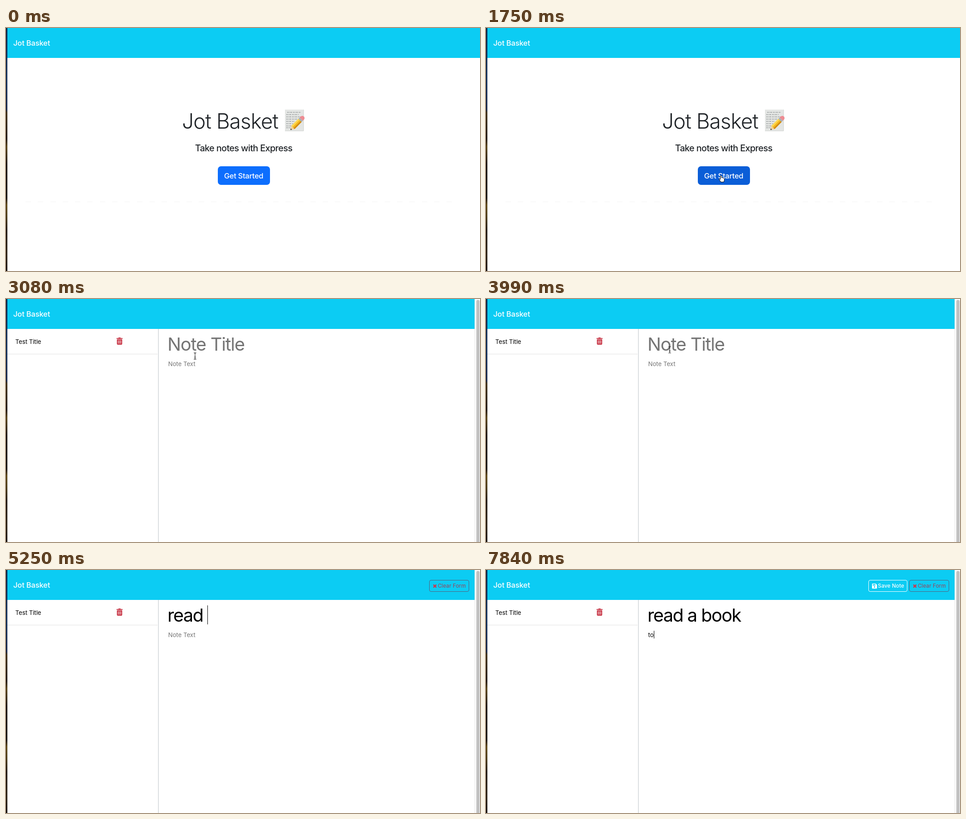
An HTML page that plays this animation: 1045x536 px, repeating every 8 s.

```html
<!DOCTYPE html>
<html lang="en">
<head>
<meta charset="utf-8">
<title>Notes</title>
<style>
html, body { margin: 0; width: 100%; height: 100%; overflow: hidden; background: #fff; }
#stage { position: relative; width: 1045px; height: 536px; overflow: hidden; background: #fff;
  font-family: Inter, "Liberation Sans", sans-serif; font-optical-sizing: none; color: #000; }
#stage div, #stage svg { position: absolute; }
/* Zero line height: top marks the middle of the capitals. */
.t { white-space: pre; line-height: 0; font-size: 13.2px; letter-spacing: 0; }
.mid { left: 3px; width: 1042px; text-align: center; }
#edge { left: 0; top: 0; width: 2.5px; height: 536px;
  background: linear-gradient(#0c2748, #12315c 110px, #16264a 180px, #3d2c0c 187px, #1d1407 245px,
    #57410f 262px, #1a1206 300px, #150e05 375px, #5e4712 390px, #4a380f 415px, #1f1608 445px, #2b1f0a 500px, #171006); }
#nav { left: 2.5px; right: 0; top: 0; height: 65.5px; background: #0cccf3; }
#brand { left: 16px; top: 33px; font-size: 16.5px; font-weight: 450; letter-spacing: -.01em; color: #fff; }
#head { left: 388px; top: 205px; font-size: 46px; font-weight: 300; letter-spacing: -.023em; color: #212529; }
#sub { top: 265px; font-size: 19.8px; font-weight: 550; letter-spacing: -.031em; color: #212529; }
#start { left: 466.5px; top: 304.5px; width: 115px; height: 41px; border-radius: 7px; background: #0d6efd; }
#start .t { left: 0; width: 100%; text-align: center; top: 21px; font-size: 16.5px; font-weight: 450; letter-spacing: -.018em; color: #fff; }
#rule { left: 42.7px; top: 383px; width: 942px; height: 1px;
  background: repeating-linear-gradient(90deg, #f4f4f4 0 12px, #fff 12px 27.3px); }
#bar { left: 1033px; top: 0; width: 12px; height: 536px; box-sizing: border-box; background: #fafafa; border-left: 1px solid #e8e8e8; }
#bar div { left: 3px; top: 2px; width: 7px; height: 545px; border-radius: 4px; background: #c1c1c1; }
#side { left: 335px; top: 66px; width: 1.5px; height: 470px; background: #dcdfe2; }
#sep { left: 3px; top: 120.5px; width: 331px; height: 1px; background: #e2e2e2; }
#title { left: 356px; top: 99.5px; font-size: 39.8px; letter-spacing: -.04em; }
#title .empty { letter-spacing: -.031em; }
#text { left: 357.5px; top: 143px; }
.empty { color: #757575; }
.caret { position: absolute; width: 1px; background: #000; }
#title .caret { height: 42px; margin-top: -22px; top: 0; }
#text .caret { height: 17px; margin-top: -9px; top: 0; }
.btn { top: 21.5px; height: 26px; box-sizing: border-box; border: 1px solid; border-radius: 4px; }
.btn .t { top: 12.3px; font-size: 11.6px; letter-spacing: .012em; }
#clear { left: 932.5px; width: 88px; border-color: #55607c; color: #9c4257; }
#save { left: 842.5px; width: 86px; border-color: #fff; color: #fff; }
#save .t { font-weight: 500; }
</style>
</head>
<body>
<div id="stage">
  <div id="edge"></div>
  <div id="nav"></div>
  <div id="brand" class="t">Jot Basket</div>

  <div id="home">
    <div id="head" class="t">Jot Basket</div>
    <svg style="left:613px;top:178px" width="48" height="52" viewBox="0 0 48 52">
      <rect x="2" y="2" width="41" height="47" fill="#e4e6e4"/>
      <path d="M2 49H43V2" fill="none" stroke="#cdd0cd"/>
      <path d="M7 8h30M5 13h27M5 18h31M5 23h26M5 28h18M5 33h15M5 38h12M5 42h9" fill="none"
        stroke="#75787a" stroke-width="1.2" stroke-dasharray="3 1 1.5 1.2 4 2"/>
      <g transform="translate(14 47) rotate(-45)">
        <path d="M0 0L8-5V5Z" fill="#efcf9c"/>
        <path d="M0 0L3-1.9V1.9Z" fill="#333"/>
        <path d="M8-5H30V5H8Z" fill="#f5b921"/>
        <path d="M8-5H30V-1.5H8Z" fill="#ffda55"/>
        <path d="M8 2H30V5H8Z" fill="#d08a14"/>
        <path d="M30-5H34V5H30Z" fill="#a9b1b5"/>
        <path d="M34-5H37Q42-4.5 42 0T37 5H34Z" fill="#ee8c93"/>
      </g>
    </svg>
    <div id="sub" class="t mid">Take notes with Express</div>
    <div id="start"><div class="t">Get Started</div></div>
    <div id="rule"></div>
  </div>

  <div id="notes">
    <div id="bar"><div></div></div>
    <div id="side"></div>
    <div id="list">
      <div id="sep"></div>
      <div class="t" style="left:20.5px;top:93.5px">Test Title</div>
      <svg style="left:243px;top:84px" width="15" height="18" viewBox="0 0 15 18" fill="#c52b3c">
        <path d="M.7 2.3H4.3L5.3 1H9.3L10.3 2.3H14V4H.7Z"/>
        <path d="M1.6 5H13.1V15Q13.1 16.7 11.4 16.7H3.3Q1.6 16.7 1.6 15Z"/>
        <path d="M4.5 7v7.5M7.35 7v7.5M10.2 7v7.5" stroke="#fff" stroke-width="1.1"/>
      </svg>
    </div>
    <div id="title" class="t"><span></span><i class="caret"></i></div>
    <div id="text" class="t"><span></span><i class="caret"></i></div>
    <div id="save" class="btn">
      <svg style="left:7px;top:7px" width="11" height="11" viewBox="0 0 11 11">
        <path d="M1.3 0H8.2L11 2.8V9.7Q11 11 9.7 11H1.3Q0 11 0 9.7V1.3Q0 0 1.3 0Z" fill="#fff"/>
        <path d="M1.7 1.6H7.6V4.2H1.7Z" fill="#0cccf3"/><circle cx="5.5" cy="7.3" r="1.6" fill="#0cccf3"/>
      </svg>
      <div class="t" style="left:20.5px">Save Note</div>
    </div>
    <div id="clear" class="btn">
      <svg style="left:7px;top:8px" width="9" height="9" viewBox="0 0 9 9">
        <path d="M1.3 1.3L7.7 7.7M7.7 1.3L1.3 7.7" stroke="#d3324a" stroke-width="2.4"/>
      </svg>
      <div class="t" style="left:18.5px">Clear Form</div>
    </div>
  </div>

  <svg id="pointer" style="left:0;top:0;overflow:visible" width="1" height="1">
    <path id="arrow" d="M0 0V11.2L2.6 8.8L4.3 12.8L6.2 12L4.5 8.1H8Z" fill="#000" stroke="#fff" stroke-width=".9"/>
    <path id="hand" d="M-1.2 1Q0-.8 1.2 1V5.2Q2.3 4.2 3.4 5.6Q4.6 4.8 5.5 6.2Q7 5.7 7.4 7.4V10.5Q7.2 12.5 6 14.8H-.2Q-1.5 12.3-4 9.2Q-4.3 7.5-2.6 7.9L-1.2 9.1Z"
      fill="#fff" stroke="#000" stroke-width="1"/>
    <path id="beam" d="M-2.6-7Q-.6-7 0-6Q.6-7 2.6-7M0-6V6.3M-2.6 7.3Q-.6 7.3 0 6.3Q.6 7.3 2.6 7.3M-1.7 2.6H1.7"
      fill="none" stroke="#222" stroke-width="1.1"/>
  </svg>
</div>
<script>
const $ = id => document.getElementById(id);
const show = (el, on) => { el.style.visibility = on ? 'inherit' : 'hidden'; };
const LOOP = 8000, STEP = 70;

// Pointer stops: time, x, y
const path = [
  [70, 590, 520], [560, 545, 400], [700, 545, 400], [1050, 518, 325],
  [2310, 518, 325], [2380, 511, 318], [3150, 416, 124], [3430, 405, 112], [LOOP, 405, 112]
];
const fields = [
  { el: $('title'), hint: 'Note Title', words: 'read a book',
    keys: [4480, 4620, 4830, 5040, 5250, 5460, 5530, 5740, 5950, 6160, 6300], focus: 3430, blur: 6790 },
  { el: $('text'), hint: 'Note Text', words: 'to', keys: [7770, 7840], focus: 6790, blur: LOOP }
];

function pointerAt(t) {
  const i = Math.max(1, path.findIndex(p => p[0] > t));
  const [t0, x0, y0] = path[i - 1], [t1, x1, y1] = path[i];
  const p = Math.max(0, (t - t0) / (t1 - t0)), e = p * (2 - p);
  return [x0 + (x1 - x0) * e, y0 + (y1 - y0) * e];
}

function drawField({ el, hint, words, keys, focus, blur }, t) {
  const n = keys.filter(k => k <= t).length;
  const [label, caret] = el.children;
  const since = t - (n ? keys[n - 1] : focus);
  label.textContent = n ? words.slice(0, n) : hint;
  label.className = n ? '' : 'empty';
  caret.style.left = n ? '' : '1px';
  show(caret, t >= focus && t < blur && since % 1120 < 560);
}

function draw(now) {
  const t = Math.floor(now % LOOP / STEP) * STEP;
  const home = t < 1820, over = t >= 1050 && home;
  show($('home'), home);
  show($('notes'), !home);
  show($('list'), t >= 1890);
  show($('clear'), t >= 4480);
  show($('save'), t >= 7770);
  $('start').style.background = over ? '#0b5ed7' : '#0d6efd';
  fields.forEach(f => drawField(f, t));

  const [x, y] = pointerAt(t);
  const beam = t > 2380;
  $('pointer').style.transform = `translate(${x}px, ${y}px)`;
  show($('pointer'), t >= 70 && t < 4480);
  show($('hand'), over);
  show($('beam'), beam);
  show($('arrow'), !over && !beam);
}

const begin = performance.now();
function tick() {
  draw(performance.now() - begin);
  requestAnimationFrame(tick);
}
tick();
</script>
</body>
</html>
```
